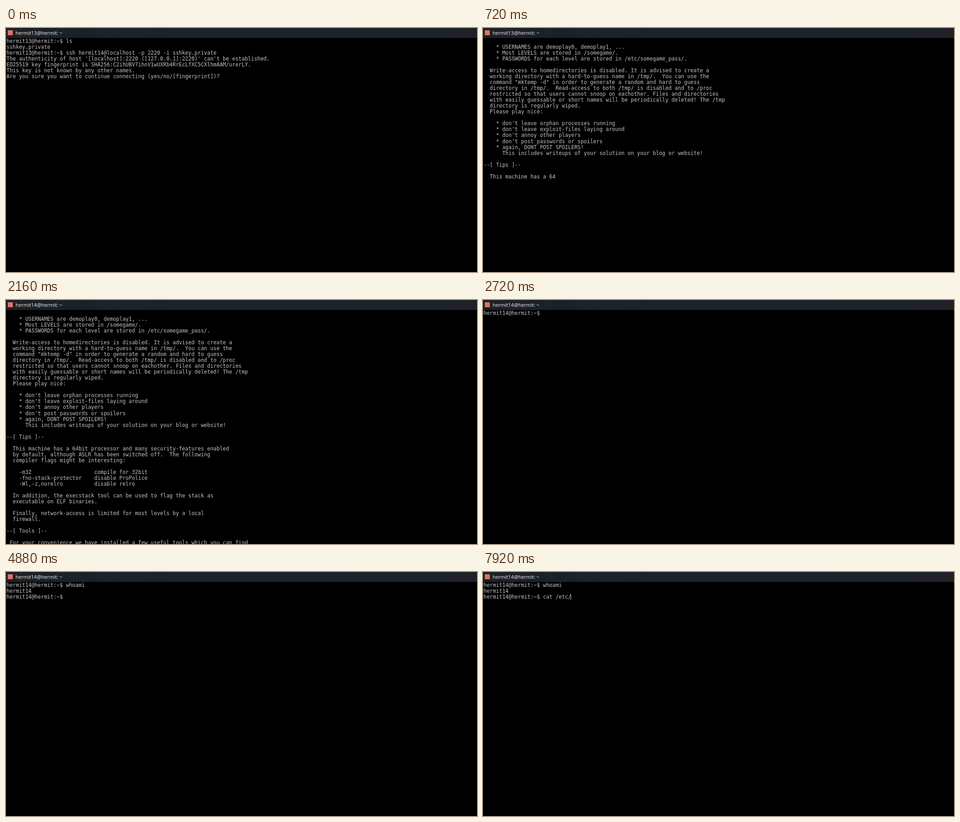
An HTML page with a canvas that plays this animation: 1038 by 540 pixels, repeating every 8 s.

```html
<!DOCTYPE html>
<html lang="en">
<head>
<meta charset="utf-8">
<title>Terminal session</title>
<style>
  html, body { margin: 0; width: 100%; height: 100%; overflow: hidden; background: #000; }
  canvas { display: block; }
</style>
</head>
<body>
<canvas id="stage" width="1038" height="540"></canvas>
<script>
const ctx = document.getElementById('stage').getContext('2d');
const LOOP = 8000, STEP = 80;
const LEFT = 1, TOP = 23, COL = 6.91, ROW = 13.03;
const FG = '#c3c3c3';
const HOST = 'hermit', OLD = HOST + '13', NEW = HOST + '14';
const prompt = user => `${user}@${HOST}:~$ `;

const LOGIN = `${prompt(OLD)}ls
sshkey.private
${prompt(OLD)}ssh ${NEW}@localhost -p 2220 -i sshkey.private
The authenticity of host '[localhost]:2220 ([127.0.0.1]:2220)' can't be established.
ED25519 key fingerprint is SHA256:C2ihUBV7ihnV1wUXRb4RrEcLfXC5CXlhmAAM/urerLY.
This key is not known by any other names.
Are you sure you want to continue connecting (yes/no/[fingerprint])? `;

const BANNER = `
    * USERNAMES are demoplay0, demoplay1, ...
    * Most LEVELS are stored in /somegame/.
    * PASSWORDS for each level are stored in /etc/somegame_pass/.

  Write-access to homedirectories is disabled. It is advised to create a
  working directory with a hard-to-guess name in /tmp/.  You can use the
  command "mktemp -d" in order to generate a random and hard to guess
  directory in /tmp/.  Read-access to both /tmp/ is disabled and to /proc
  restricted so that users cannot snoop on eachother. Files and directories
  with easily guessable or short names will be periodically deleted! The /tmp
  directory is regularly wiped.
  Please play nice:

    * don't leave orphan processes running
    * don't leave exploit-files laying around
    * don't annoy other players
    * don't post passwords or spoilers
    * again, DONT POST SPOILERS!
      This includes writeups of your solution on your blog or website!

--[ Tips ]--

  This machine has a 64`;

const REST = `bit processor and many security-features enabled
  by default, although ASLR has been switched off.  The following
  compiler flags might be interesting:

    -m32                    compile for 32bit
    -fno-stack-protector    disable ProPolice
    -Wl,-z,norelro          disable relro

  In addition, the execstack tool can be used to flag the stack as
  executable on ELF binaries.

  Finally, network-access is limited for most levels by a local
  firewall.

--[ Tools ]--

 For your convenience we have installed a few useful tools which you can find`;

// Key press times for each typed word
const YES = [160, 240, 320];
const WHOAMI = [3120, 3280, 3440, 3600, 3760, 3920];
const CAT = [5440, 5520, 5680, 5760, 6480, 6720, 6800, 7200, 7360];
const typed = (word, keys, t) => word.slice(0, keys.filter(k => k <= t).length);

function screenAt(t) {
  if (t < 720) return LOGIN + typed('yes', YES, t);
  if (t < 800) return BANNER;
  if (t < 2480) return BANNER + REST;
  const first = prompt(NEW) + typed('whoami', WHOAMI, t);
  if (t < 4640) return first;
  return `${first}\n${NEW}\n${prompt(NEW)}${typed('cat /etc/', CAT, t)}`;
}

function drawTitle(t) {
  const bar = ctx.createLinearGradient(0, 0, 1038, 0);
  bar.addColorStop(0, '#1c2125');
  bar.addColorStop(0.4, '#1a222a');
  bar.addColorStop(1, '#1e2227');
  ctx.fillStyle = bar;
  ctx.fillRect(0, 0, 1038, 22);
  ctx.fillStyle = '#dd7468';
  ctx.fillRect(4, 5, 11, 11);
  ctx.fillStyle = '#f4f4f4';
  ctx.font = '11px "Open Sans", "Noto Sans", sans-serif';
  ctx.fillText(`${t < 960 ? OLD : NEW}@${HOST}: ~`, 21, 15);
}

function drawText(lines) {
  ctx.fillStyle = FG;
  ctx.font = '11.48px "DejaVu Sans Mono", "Noto Sans Mono", monospace';
  lines.forEach((line, row) => {
    const y = Math.round(TOP + 10 + row * ROW);
    [...line].forEach((ch, col) => {
      if (ch !== ' ') ctx.fillText(ch, LEFT + col * COL, y);
    });
  });
}

function drawCursor(lines, t) {
  const blinkOn = (t + 1020) % 1060 < 530;
  if (!blinkOn || (t >= 720 && t < 2480)) return;
  const row = lines.length - 1;
  ctx.fillRect(Math.round(LEFT + lines[row].length * COL) - 1, Math.round(TOP + row * ROW), 1, 13);
}

function draw(now) {
  const t = Math.floor((now % LOOP) / STEP) * STEP;
  const lines = screenAt(t).split('\n');
  ctx.fillStyle = '#000';
  ctx.fillRect(0, 0, 1038, 540);
  drawTitle(t);
  drawText(lines);
  drawCursor(lines, t);
}

let start;
function tick(now) {
  start ??= now;
  draw(now - start);
  requestAnimationFrame(tick);
}
draw(0);
requestAnimationFrame(tick);
</script>
</body>
</html>
```
